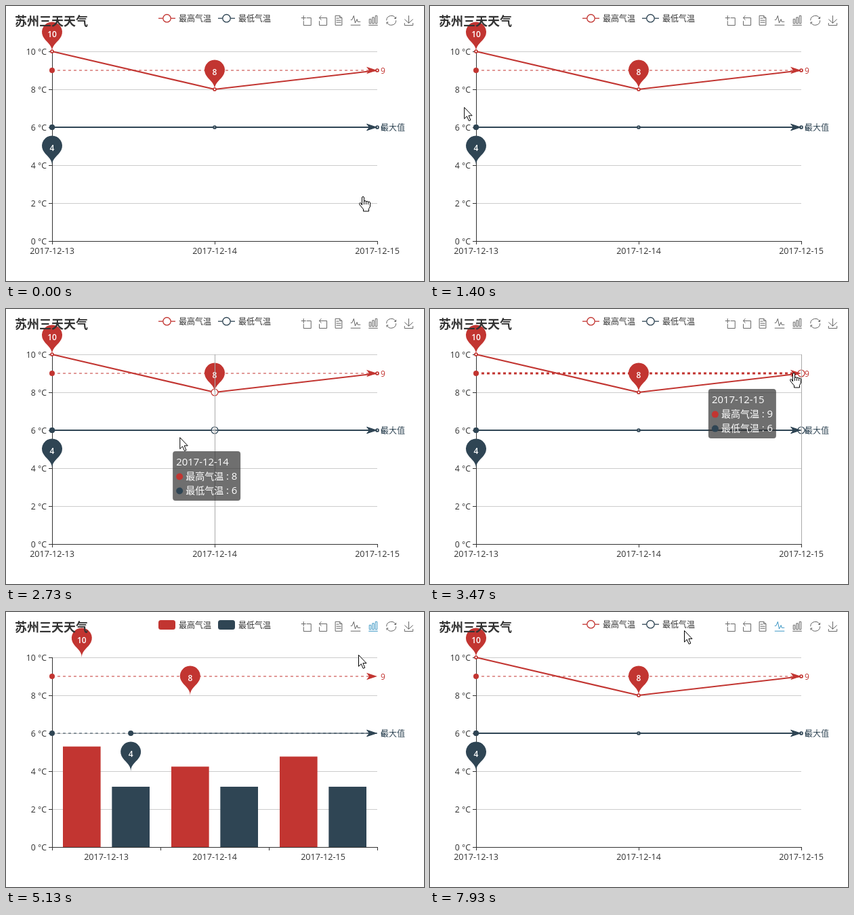
Recreate the animation shown at these times as an HTML page. Size 617 by 406 pixels, loop 8000 ms.

```html
<!DOCTYPE html>
<html lang="zh">
<head>
<meta charset="utf-8">
<title>苏州三天天气</title>
<style>
html, body { margin: 0; width: 100%; height: 100%; overflow: hidden; background: #fff; }
svg { display: block; width: 617px; height: 406px; }
text { font: 12px "Open Sans", "Noto Sans CJK SC", "Noto Sans CJK", sans-serif; fill: #333; }
.title { font-size: 18px; font-weight: 700; }
.date { font-size: 12.6px; text-anchor: middle; }
.deg { font-size: 12.3px; text-anchor: end; }
.pin text { font-weight: 600; fill: #fff; text-anchor: middle; }
.tip text { font-size: 14px; font-weight: 500; fill: #fff; }
.tip .num { font-size: 14.9px; }
.hint { fill: #3e98c5; text-anchor: middle; }
.axis { stroke: #333; }
.grid { stroke: #ccc; }
.icon { fill: none; stroke: #666; }
.icon.on { stroke: #3e98c5; }
.cursor { fill: #fff; stroke: #000; stroke-linejoin: round; }
</style>
</head>
<body>
<svg id="stage" viewBox="0 0 617 406">
  <defs><clipPath id="reveal"><rect id="sweep" x="66" y="55" height="300"/></clipPath></defs>
</svg>
<script>
const RED = '#c23531', DARK = '#2f4554';
const LOOP = 8000, TO_BAR = 4600, TO_LINE = 6870;
const LEFT = 68, RIGHT = 548, TOP = 67, BOTTOM = 347, BAR = 55.65;
const stage = document.getElementById('stage');
const sweep = document.getElementById('sweep');

function set(el, attrs) {
  for (const k in attrs) el.setAttribute(k, attrs[k]);
  return el;
}
function add(tag, attrs, parent = stage, text) {
  const el = set(document.createElementNS('http://www.w3.org/2000/svg', tag), attrs);
  if (text !== undefined) el.textContent = text;
  return parent.appendChild(el);
}
const group = (cls = '') => add('g', { class: cls });
const label = (x, y, text, attrs = {}, parent) => add('text', { x, y, ...attrs }, parent, text);
const path = (d, attrs, parent) => add('path', { d, ...attrs }, parent);
const show = (el, on) => { el.style.display = on ? '' : 'none'; };
const move = (el, x, y) => set(el, { transform: `translate(${x.toFixed(2)} ${y.toFixed(2)})` });
const mix = (a, b, p) => a + (b - a) * p;
const part = (t, from, span) => Math.min(1, Math.max(0, (t - from) / span));
const settle = (t, from) => 1 - (1 - part(t, from, 300)) ** 3;

const days = ['2017-12-13', '2017-12-14', '2017-12-15'];
const series = [
  { name: '最高气温', color: RED, data: [10, 8, 9] },
  { name: '最低气温', color: DARK, data: [6, 6, 6] }
];
const yOf = v => BOTTOM - 28 * v;
const lineX = i => LEFT + 240 * i;
const barX = (i, k) => 84 + 160 * i + 1.3 * BAR * k;

// Axes
for (let v = 0; v <= 10; v += 2) {
  const y = yOf(v) + .5;
  if (v) path(`M${LEFT} ${y}H${RIGHT}`, { class: 'grid' });
  path(`M63 ${y}H${LEFT}`, { class: 'axis' });
  label(60, y + 4, v + ' °C', { class: 'deg' });
}
path('M68.5 67V348M68 347.5H549', { class: 'axis', fill: 'none' });
const ticks = path('', { class: 'axis' });
const dates = days.map(d => label(0, 366.3, d, { class: 'date' }));

// Series
const barLayer = group(), lineLayer = group();
const bars = [], dots = [];
series.forEach(({ color, data }, k) => {
  const d = 'M' + data.map((v, i) => lineX(i) + ' ' + yOf(v)).join('L');
  path(d, { fill: 'none', stroke: color, 'stroke-width': 2, 'clip-path': 'url(#reveal)' }, lineLayer);
  data.forEach((v, i) => {
    bars.push({ v, el: add('rect', { x: barX(i, k), width: BAR, fill: color }, barLayer) });
    dots.push({ i, el: add('circle', { cx: lineX(i), cy: yOf(v), fill: '#fff', stroke: color }, lineLayer) });
  });
});

// Mark lines and pins
function markLine(v, color, text, dash = 'none') {
  const y = yOf(v);
  const line = path('', { stroke: color, 'stroke-dasharray': dash });
  const dot = add('circle', { cy: y, r: 4, fill: color });
  path(`M${RIGHT} ${y}l-16 5.3 4-5.3-4-5.3z`, { fill: color });
  label(553, y + 4.5, text, { style: `fill:${color}` });
  const place = x => { set(line, { d: `M${x} ${y}H${RIGHT}` }); set(dot, { cx: x }); };
  place(LEFT);
  return { line, place };
}
const highMark = markLine(9, RED, '9', '4 4');
markLine(6, DARK, '6', '4 4');
const maxMark = markLine(6, DARK, '最大值');

function pin(k, i, v) {
  const el = group('pin');
  path('M-13.55-22.14A15 15 0 1 1 13.55-22.14C9.69-14 0-10.5 0 0C0-10.5-9.69-14-13.55-22.14Z', { fill: series[k].color }, el);
  label(0, -21.2, v, {}, el);
  return { el, from: lineX(i), to: barX(i, k) + BAR / 2, y: yOf(v) };
}
const pins = [pin(0, 0, 10), pin(0, 1, 8), pin(1, 0, 4)];

// Title, legend, toolbox
label(13, 28.6, '苏州三天天气', { class: 'title' });
const lineKeys = group(), barKeys = group();
const names = series.map(({ name, color }, k) => {
  const x = 225 + 88 * k, pen = { stroke: color, 'stroke-width': 1.3 };
  path(`M${x} 18.2h25`, pen, lineKeys);
  add('circle', { cx: x + 12.5, cy: 18.2, r: 5.7, fill: '#fff', ...pen }, lineKeys);
  add('rect', { x, y: 12, width: 25, height: 14, rx: 3.5, fill: color }, barKeys);
  return label(x + 30, 0, name);
});

function icon(cx, d, hint = '') {
  const el = path(d, { class: 'icon' }), b = el.getBBox();
  move(el, cx - b.x - b.width / 2, 21.3 - b.y - b.height / 2);
  return { cx, el, hint: label(cx, 47.6, hint, { class: 'hint' }) };
}
icon(443, 'M0 3.5h7M3.5 0v7M8 3.5h6.5v11h-11V8');
icon(468, 'M5.5 0l-3 3.3 3 3.3M2.6 3.3h11v11h-11V8');
icon(491, 'M3 .5h6.6l3.2 3.2v10.8H3zM9.6.5v3.2h3.2M4.5 4.3h4M4.5 7.4h7M4.5 10.4h7');
const lineIcon = icon(516, 'M0 7h2l2.6-6 2.1 10.7 2.7-5.6.9 3.7h4.2M0 14.8h14.5', '切换为折线图');
const barIcon = icon(542, 'M1.5 5.5H4V12H1.5zM6 3h2.5v9H6zM10.5.5H13V12h-2.5zM.5 14.5H14', '切换为柱状图');
icon(568.7, 'M12 4.7h2.4V2.1M14 5A7 7 0 0 0 .5 7.5M3.2 10.2H.8v2.6M1 10A7 7 0 0 0 14.5 7.5');
icon(594.5, 'M1 5.5l6.2 5.7 6.2-5.7M1 11v3.5h12.4V11M7.2 11.2V0');

// Axis pointer, tooltip, cursor
const pointer = path('', { stroke: '#aaa' });
const tip = group('tip');
const tipBox = add('rect', { height: 73, rx: 4, fill: 'rgba(50,50,50,.7)' }, tip);
const tipDay = label(5, 21, '', { class: 'num' }, tip);
const tipVals = series.map(({ name, color }, k) => {
  const y = 37 + 21 * k;
  add('circle', { cx: 10, cy: y + .5, r: 5, fill: color }, tip);
  return add('tspan', { class: 'num' }, label(19, y + 5, name, {}, tip));
});
const arrow = path('M.5.5V17.3L4.3 13.6 7.2 20.3 9.8 19.2 6.9 12.6H12Z', { class: 'cursor' });
const hand = path('M-1.5 13V2Q-1.5.5 0 .5T1.5 2V8Q1.5 6.5 3 6.5T4.5 8.5Q4.5 7.2 6 7.2T7.5 9.3Q7.5 8 9 8T10.5 10V15L8.5 18.5V22H.5V19L-4.5 13Q-6.3 10.2-4.6 9.6T-1.5 13M1.5 8V12M4.5 8.5V12M7.5 9.3V12', { class: 'cursor' });

// Cursor stops: ms, x, y. Everything hovered follows from these.
const stops = [
  [70, 527, 281], [270, 60, 205], [460, 68, 92], [600, 83, 60], [870, 83, 60],
  [1270, 30, 180], [1650, 89, 90], [1930, 69, 194], [2030, 69, 194], [2130, 92, 193],
  [2930, 311, 188], [3370, 536, 96], [3470, 537, 94], [4130, 541, 23], [4600, 541, 23],
  [5130, 520, 63], [5470, 520, 63], [6470, 517, 23], [6870, 517, 23], [7300, 470, 45], [7930, 375, 27]
];
function cursorAt(t) {
  const i = stops.findIndex(s => s[0] > t);
  const b = stops.at(i), a = i > 0 ? stops[i - 1] : b;
  const p = part(t, a[0], b[0] - a[0] || 1);
  return [mix(a[1], b[1], p), mix(a[2], b[2], p)];
}
function dayAt([x, y]) {
  const inside = x >= LEFT && x <= RIGHT && y >= TOP && y <= BOTTOM;
  return inside ? Math.round((x - LEFT) / 240) : -1;
}

// The tooltip trails the cursor and lingers after it leaves the grid
function drawTip(t) {
  let s = Math.floor(t / 20) * 20;
  const end = s - 300;
  while (s > end && dayAt(cursorAt(s)) < 0) s -= 20;
  const day = t < 70 ? -1 : dayAt(cursorAt(s));
  show(tip, day >= 0);
  if (day < 0) return;
  const [x, y] = cursorAt(s - 100), w = day ? 100 : 108;
  move(tip, x + 20 + w > RIGHT ? x - 20 - w : x + 20, y + 20);
  set(tipBox, { width: w });
  tipDay.textContent = days[day];
  tipVals.forEach((el, k) => { el.textContent = ' : ' + series[k].data[day]; });
}

function draw(t) {
  const bar = t >= TO_BAR && t < TO_LINE, after = t >= TO_LINE;
  const shift = after ? 1 - settle(t, TO_LINE) : settle(t, TO_BAR);
  const grow = part(t, TO_BAR, 1000);
  const wipe = after ? part(t, TO_LINE, 1000) : 1;

  const [x, y] = cursorAt(t);
  const day = t < 70 ? -1 : dayAt([x, y]);
  const onMark = day >= 0 && Math.abs(y - yOf(9)) < 4;
  const onPin = Math.hypot(x - LEFT, y - 206) < 15;
  const over = [lineIcon, barIcon].find(o => y < 31 && Math.abs(x - o.cx) < 10);

  show(barLayer, bar); show(barKeys, bar);
  show(lineLayer, !bar); show(lineKeys, !bar);
  names.forEach(el => set(el, { y: bar ? 23.5 : 22.7 }));
  const edges = bar ? [0, 160, 320, 480] : [0, 240, 480];
  set(ticks, { d: edges.map(e => `M${LEFT + e + .5} ${BOTTOM}v5`).join('') });
  dates.forEach((el, i) => set(el, { x: mix(lineX(i), 148 + 160 * i, shift) }));

  bars.forEach(({ el, v }) => set(el, { y: yOf(v * grow), height: 28 * v * grow }));
  set(sweep, { width: 4 + 480 * wipe });
  dots.forEach(({ el, i }) => {
    const big = i === day;
    set(el, { r: big ? 5 : 2 * wipe, 'stroke-width': big ? 1.2 : 1.7 * wipe });
  });

  maxMark.place(mix(LEFT, barX(0, 1) + BAR / 2, shift));
  set(highMark.line, { 'stroke-width': onMark ? 3 : 1 });
  pins.forEach(p => move(p.el, mix(p.from, p.to, shift), p.y));

  lineIcon.el.classList.toggle('on', over === lineIcon || after);
  barIcon.el.classList.toggle('on', over === barIcon || bar);
  [lineIcon, barIcon].forEach(o => show(o.hint, over === o));

  show(pointer, day >= 0);
  set(pointer, { d: `M${lineX(day) + .5} ${TOP}V${BOTTOM}` });
  drawTip(t);

  const point = t < 70 || onMark || onPin || !!over;
  show(hand, point);
  show(arrow, !point);
  move(point ? hand : arrow, x, y);
}

let start;
function frame(now) {
  start ??= now;
  draw((now - start) % LOOP);
  requestAnimationFrame(frame);
}
draw(0);
requestAnimationFrame(frame);
</script>
</body>
</html>
```
